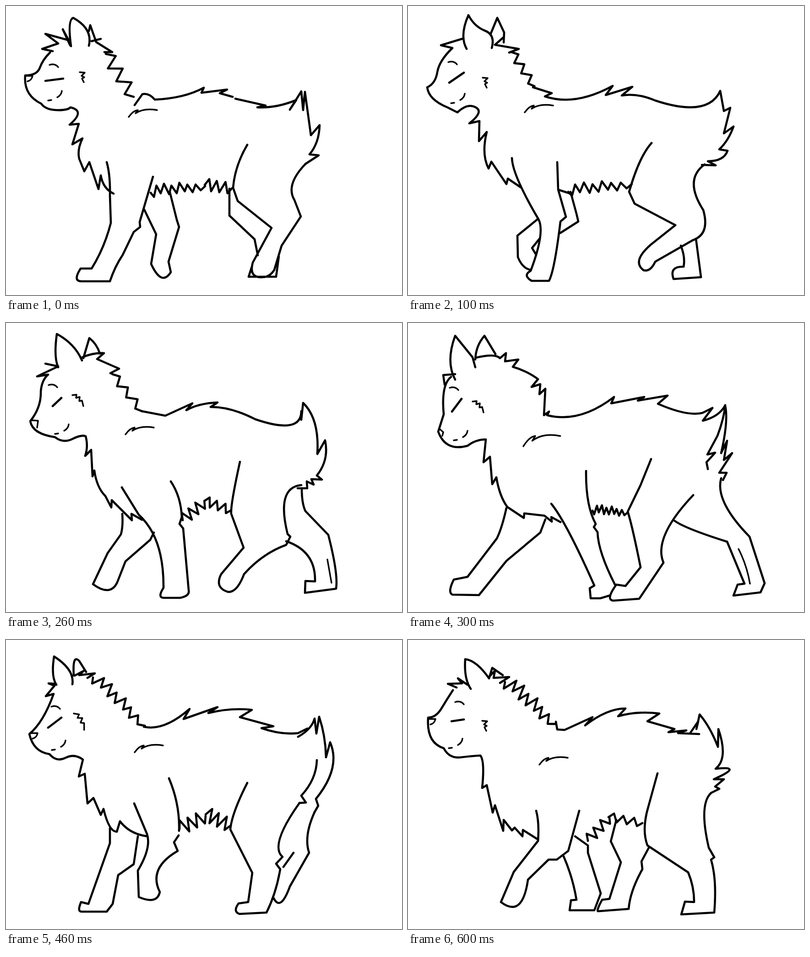
An HTML page without scripts for the animation above (700 ms loop, 865x633 px).

```html
<!DOCTYPE html>
<html lang="en">
<head>
<meta charset="utf-8">
<title>Walk cycle</title>
<style>
html, body { margin: 0; width: 100%; height: 100%; overflow: hidden; background: #fff; }
svg { display: block; width: 100vw; height: 100vh; }
path { fill: none; stroke: #000; stroke-width: 4.6; stroke-linecap: round; stroke-linejoin: round; vector-effect: non-scaling-stroke; }
.fine { stroke-width: 3.4; }
.pose { visibility: hidden; animation: show .7s step-end infinite; animation-delay: calc((var(--n) - 7) * .1s); }
@keyframes show { 0% { visibility: visible; } 14.2857%, 100% { visibility: hidden; } }
</style>
</head>
<body>
<svg viewBox="0 0 865 633">
<defs>
<!-- fur edges, 100 units long -->
<path id="fur" d="M0 0l5 10 7-24 6 18 8-20 7 24 6-18 8 18 7-22 8 20 6-14 8 18 7-16 8 14 9-8"/>
<path id="zig" d="M0 0l14-14 12 26 16-24 14 24 18-24 12 24 14-12"/>
<!-- small marks -->
<path id="brow" class="fine" d="M0 0q12-4 19 5"/>
<path id="mouth" class="fine" d="M0 0l7-1m13-6q9-5 10-14"/>
<path id="nose" class="fine" d="M0 0h14q-2 10-11 12"/>
<path id="cheek" class="fine" d="M0 0l11 1-7 7 6 3-5 3 4 8"/>
<path id="tuft" class="fine" d="M0 0l9-1-1 7 8-2-1 9 6-1 3 12"/>
<path id="arm" class="fine" d="M0 0q10-14 20-15l-5 7q18-12 47-7"/>
</defs>

<g class="pose" style="--n:0">
<path d="M142 88Q134 30 147 26Q190 50 181 87M181 55L184 42 197 79 232 101H215M187 77L207 72M281 217L298 193Q312 190 325 205Q390 202 432 179L427 190 483 183 467 191 495 199M501 203L567 218 549 222Q590 224 634 206L620 227 645 187 649 228 653 188 666 283 685 261Q684 300 663 325L683 327 654 346"/>
<path d="M140 86L124 51 137 75 86 61 114 82 79 94 102 99M96 102Q80 118 74 135T42 152Q38 195 77 214Q86 227 110 228T141 222Q174 230 139 260L159 258 145 303 167 290Q155 315 160 335L171 362 182 342 202 401 207 371Q212 400 235 411M86 164L125 159"/>
<path d="M654 346Q610 392 630 425L644 461 602 525 586 578Q576 594 560 594Q530 596 539 562L580 486 506 427 496 398Q500 350 527 304M488 400V459L543 511 550 546M537 571L530 593H590L596 548"/>
<path d="M220 342Q228 370 227 415L229 475Q215 530 187 575H163Q145 603 165 603H227Q238 570 255 545L279 495 293 484 292 473 321 374M302 446L328 500 317 565Q340 615 360 583L355 560 378 484 373 468 358 408"/>
<use href="#zig" transform="translate(218 105)rotate(57)scale(1.12)"/>
<use href="#fur" transform="translate(316 409)rotate(-7)scale(1.2 1)"/>
<use href="#zig" transform="translate(434 392)rotate(7)scale(.6 1)"/>
<use href="#nose" x="44" y="153"/><use href="#brow" x="95" y="129"/><use href="#mouth" x="92" y="207"/>
<use href="#cheek" x="161" y="145"/><use href="#arm" x="268" y="243"/>
</g>

<g class="pose" style="--n:1">
<path d="M128 94Q112 65 132 20Q145 45 168 54T183 92M181 60L195 26 210 58 209 80M208 69L190 85 242 94 221 102M273 178L314 191 299 198Q365 220 447 175L432 195 490 177 467 196Q500 190 540 207Q655 245 682 186L690 230 704 223 690 279 711 264Q700 295 680 314L698 317Q690 340 655 340L672 349 642 348"/>
<path d="M121 71L72 86 97 92Q68 120 64 145T42 178Q45 205 86 222L108 233Q130 212 148 222T134 257L156 252 155 296 172 276Q160 325 176 356L182 341 215 390 218 378 246 397M90 168L122 146"/>
<path d="M648 347Q602 380 645 447Q660 500 622 513L540 560Q530 582 515 579Q488 560 530 523L584 480 495 433 483 407Q505 330 532 300M596 525Q606 550 602 571Q570 570 580 598L640 594 629 510"/>
<path d="M227 333Q228 370 285 467Q300 495 268 580Q250 590 270 602H308Q320 580 333 472L345 462 328 402 326 342M330 403L352 410M355 407L368 455 372 472 333 497M283 467L239 503 240 550Q250 575 268 578M287 510L271 530 280 545"/>
<use href="#zig" transform="translate(226 101)rotate(56)scale(.9 .7)"/>
<use href="#fur" transform="translate(350 407)rotate(-7)scale(1.4 1)"/>
<use href="#brow" x="88" y="123"/><use href="#mouth" x="94" y="213"/>
<use href="#cheek" x="163" y="157"/><use href="#arm" x="255" y="233"/>
</g>

<g class="pose" style="--n:2">
<path d="M114 97Q104 75 111 24Q150 45 166 82M169 77L182 33Q198 45 205 67M167 75Q190 65 214 66L199 79 247 100 228 110M296 193L348 203 407 176 394 191Q420 176 462 174L447 184Q490 183 545 211Q645 245 645 193V212L649 175Q685 210 680 287L697 257Q706 300 679 334L690 343 667 342 672 354 657 347 658 362 637 362"/>
<path d="M86 89L114 95 68 117 92 113Q78 125 76 150Q77 185 53 215Q58 243 107 250Q125 264 145 254T174 248Q180 270 173 291L186 278 189 336 193 323Q198 360 217 379L230 404 231 388 275 432 274 418 297 431M102 182L121 164"/>
<path d="M645 355Q590 360 615 462L621 468 612 486Q560 505 520 550Q505 590 485 589Q455 580 470 550L519 492 492 418Q490 400 511 304M646 362Q646 395 654 412L704 464Q726 550 721 582L653 591 654 565 675 566Q677 500 612 478"/>
<path d="M253 360L290 420Q345 470 344 580Q330 602 345 602H380Q402 598 399 585L387 450 379 440 384 425Q382 380 360 347M254 418Q256 445 251 463L222 504 190 572Q228 600 243 568L261 522 315 475 323 459"/>
<path class="fine" d="M702 518L711 569M56 213L70 214 68 229"/>
<use href="#zig" transform="translate(232 112)rotate(51)scale(1.05 .7)"/>
<use href="#zig" transform="translate(386 432)rotate(-40)scale(.62 1)"/>
<use href="#zig" transform="translate(433 390)rotate(19)scale(.62 .8)"/>
<use href="#brow" x="93" y="136"/><use href="#mouth" x="107" y="243"/>
<use href="#tuft" x="145" y="158"/><use href="#arm" x="261" y="244"/>
</g>

<g class="pose" style="--n:3">
<path d="M103 124Q82 85 103 28L141 75 147 97M147 80Q148 50 167 28L191 68M148 76Q190 66 201 77L214 66 212 84 241 80 229 96Q260 105 284 123L270 140 289 134 287 156 300 144 297 202 308 194 304 202Q375 220 450 162L444 176 516 162 502 170 567 159 546 177Q610 205 643 197L665 186 644 214Q680 205 693 180Q690 210 676 247L654 288 671 284 652 305 655 320M693 182Q700 215 684 285L697 258 690 300 708 285 680 328H696L688 344"/>
<path d="M103 112L77 114 80 135M94 118Q72 135 78 200L66 238Q82 282 130 269Q148 255 170 255L165 305 179 293 184 353 193 338Q200 380 217 403L253 427 254 417 298 422 314 435 313 425 333 436M96 194L117 166"/>
<path d="M531 298L508 355 480 413Q490 445 508 535L475 576 455 573Q430 608 450 608L505 604 558 525Q535 470 623 377M582 433Q605 450 697 479L735 571 720 573 711 597 770 590 779 570 746 468Q670 390 684 340"/>
<path d="M215 405Q205 450 194 472L130 556 100 562Q86 590 97 595L155 596 215 521 289 459 300 430M313 396Q345 435 407 575L397 581 399 603H420L440 597M389 324Q388 400 410 440L406 447 414 458Q415 500 452 573"/>
<path class="fine" d="M722 495Q740 530 747 571M70 233L77 239 75 247"/>
<use href="#fur" transform="translate(403 411)rotate(3)scale(.77 .8)"/>
<use href="#brow" x="91" y="142"/><use href="#mouth" x="100" y="257"/>
<use href="#tuft" x="141" y="172"/><use href="#arm" transform="translate(252 270)scale(1.3 1.5)"/>
</g>

<g class="pose" style="--n:4">
<path d="M110 98Q98 80 105 36Q150 65 145 97M148 78Q145 30 160 46L175 70M150 78L169 68 160 77 194 73 178 83M301 190Q345 200 401 151L388 173 462 147 442 160Q490 148 537 153L511 169 584 189 558 193Q600 208 638 204L658 194M638 212Q668 195 674 172L678 205 684 168Q698 210 699 257L708 224Q732 280 677 348L682 363 674 377M679 263Q678 305 645 341L655 356 641 357"/>
<path d="M108 96L93 95 106 100 87 123 104 118Q82 180 51 206Q60 245 95 250Q110 268 130 258T168 262L159 299 172 293 178 358 191 346 207 383 213 370Q225 420 242 420L249 397Q270 425 309 430M92 192L121 170"/>
<path d="M641 357Q575 450 604 475L590 490 599 502Q590 555 569 597L510 600Q495 595 508 577L529 574 538 510 490 415Q493 380 527 313M674 377Q650 430 662 466L620 540Q600 595 585 566M606 497L628 466"/>
<path d="M280 358L308 425Q318 455 288 505L290 563Q330 580 336 552Q310 500 375 462L367 443 377 428M378 418Q380 360 356 303M227 412V445L180 578 164 574Q155 595 165 595H220L233 578 245 515 279 491 288 430"/>
<use href="#fur" transform="translate(190 82)rotate(43)scale(1.55 1.1)"/>
<use href="#zig" transform="translate(379 414)rotate(-27)scale(.64 1.2)"/>
<use href="#zig" transform="translate(436 382)rotate(24)scale(.6 1.2)"/>
<use href="#nose" x="55" y="204"/><use href="#brow" x="99" y="146"/><use href="#mouth" x="100" y="241"/>
<use href="#tuft" transform="translate(148 161)rotate(15)scale(1.3 1.2)"/><use href="#arm" x="281" y="246"/>
</g>

<g class="pose" style="--n:5">
<path d="M133 113Q112 95 118 37Q170 60 180 91M151 57L149 46 181 74M172 83L192 73 186 84 225 81 208 96Q250 95 279 112L262 124 280 122 270 137 287 133 276 150 288 146 295 178 315 183 308 192 340 184 333 197 388 165 376 185Q415 165 466 154L450 166Q500 150 549 165L535 168 595 180 578 181 645 187 624 194Q655 190 680 175L676 220 666 245 681 203Q705 285 674 298L700 284Q697 305 650 321L675 325"/>
<path d="M120 98L82 101 109 108M109 111Q80 122 70 150T41 182Q38 230 76 241Q85 257 110 257T155 252Q168 260 168 303L173 295 182 364 190 343Q200 385 227 425L231 398 265 430 263 417 283 432M96 171V178L122 174"/>
<path d="M675 325Q600 365 640 430L668 472 665 484Q640 606 630 606H585Q558 595 570 576L593 570Q605 535 606 500L594 484 519 415 515 372 550 286M485 402L550 469Q535 500 502 517L487 570Q515 595 530 539L596 487"/>
<path d="M283 369V455L236 504 218 567Q235 573 250 572Q264 555 263 525L317 479 348 458Q362 420 367 362M308 486Q313 520 308 573L287 576 282 597 335 599Q345 560 341 510Q343 480 367 457"/>
<use href="#fur" transform="translate(357 445)rotate(-32)scale(1.25 1)"/>
<use href="#zig" transform="translate(464 380)rotate(27)scale(.6 .9)"/>
<use href="#nose" x="43" y="187"/><use href="#brow" x="95" y="137"/><use href="#mouth" x="87" y="237"/>
<use href="#cheek" x="164" y="183"/><use href="#arm" transform="translate(266 252)scale(1.3 1)"/>
</g>

<g class="pose" style="--n:6">
<path d="M137 107Q122 85 125 42Q150 45 177 84L184 61 207 77M178 80L190 67 187 83 221 81 201 94M323 179L326 196 342 197 403 169 387 187Q435 150 475 150L459 167Q500 155 549 161L523 178 582 195 569 202 608 198 590 204 636 206M617 203L634 178 630 195 637 163Q660 190 677 234L678 195Q700 260 672 282Q735 275 668 305H690L671 321 680 326 662 335"/>
<path d="M130 98L109 84 118 95 87 96 106 104M98 110Q85 130 73 150T44 170Q40 225 78 237Q90 260 115 257T158 253Q168 265 162 324L172 318 185 378 190 362 208 418 209 394 227 417 233 411 250 430 251 416 284 437M95 178L122 174"/>
<path d="M662 335Q635 360 657 455L669 476 662 481Q675 525 669 597L597 601 605 573 625 574Q625 540 612 509L523 450Q510 415 525 365L545 292M455 394L443 441 465 487 440 567 424 569Q410 595 416 594L482 589Q485 550 512 502L510 485 526 455"/>
<path d="M280 374Q287 400 284 440L231 508 203 574Q250 610 262 525L307 481H325L350 462 374 374M340 474Q360 520 368 569L356 570 353 592H407L421 555 393 466V450L365 430"/>
<use href="#fur" transform="translate(212 92)rotate(40)scale(1.43 1.3)"/>
<use href="#zig" transform="translate(393 440)rotate(-48)scale(.7 .9)"/>
<use href="#zig" transform="translate(438 388)rotate(10)scale(.75 .7)"/>
<use href="#nose" x="46" y="173"/><use href="#brow" x="103" y="136"/><use href="#mouth" x="89" y="237"/>
<use href="#cheek" x="162" y="177"/><use href="#arm" x="287" y="273"/>
</g>
</svg>
</body>
</html>
```
